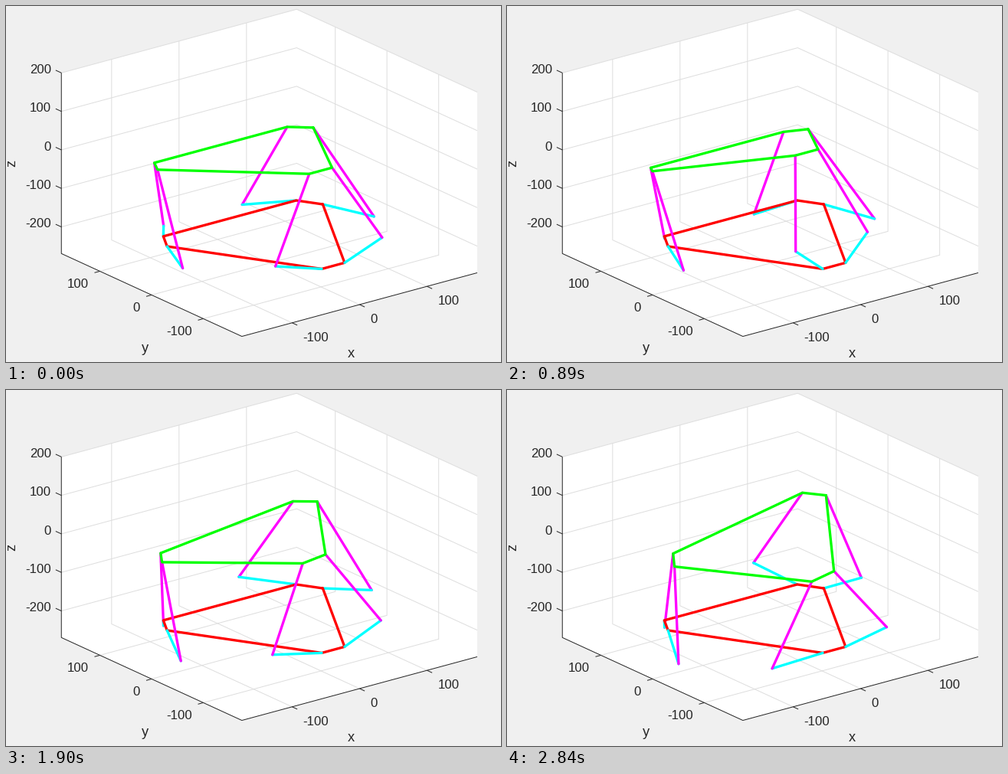
Recreate the animation shown at these times as a matplotlib script. Size 646 by 465 pixels, loop 3220 ms.

```python
import numpy as np
import matplotlib.pyplot as plt
from matplotlib.animation import FuncAnimation
from matplotlib.collections import LineCollection

W, H, DPI = 646, 465, 64
TICK, LOOP = 10, 3220            # ms
LIM, ZMIN, ZMAX = 174.5, -269.2, 200
INK, GRID = "#262626", "#dedede"

# Hexapod: corner radius, servo arm length, rod length, base height
RADIUS, ARM, ROD, FLOOR = 124.7, 70, 211, -200
TURN, LAST = 12, 37              # step of the reversal, last step


def pt(px):
    return px * 72 / DPI


def proj(x, y, z):
    return (343.6 + 0.88 * x - 0.675 * y,
            200.5 - 0.238 * x - 0.31 * y - 0.503 * z)


def project(points):
    return np.column_stack(proj(*np.transpose(points)))


def closed(points):
    return np.vstack([points, points[:1]])


# Corners sit in three close pairs; each arm swings in the plane that is
# perpendicular to its corner's radius, away from its partner.
side = np.tile([-1, 1], 3)
angle = np.radians(np.repeat([30, 150, 270], 2) + 7.8 * side)
swing = angle + side * np.pi / 2
zero = np.zeros(6)
corners = RADIUS * np.column_stack([np.cos(angle), np.sin(angle), zero])
base = corners + [0, 0, FLOOR]
out = np.column_stack([np.cos(swing), np.sin(swing), zero])
up = np.array([0, 0, 1])


def rotation(pitch, roll, yaw):
    (cp, cr, cy), (sp, sr, sy) = (f(np.radians([pitch, roll, yaw]))
                                  for f in (np.cos, np.sin))
    rx = np.array([[1, 0, 0], [0, cp, -sp], [0, sp, cp]])
    ry = np.array([[cr, 0, -sr], [0, 1, 0], [sr, 0, cr]])
    rz = np.array([[cy, -sy, 0], [sy, cy, 0], [0, 0, 1]])
    return rz @ ry @ rx


def plate_at(step):
    """Platform corners: tilt and slide back, then level out while rolling."""
    pitch = -30 + 1.25 * abs(step - TURN)
    t = max(0, step - TURN) / (LAST - TURN)
    shift = 20 + 16.6 * step / TURN if step < TURN else 36.6 * (1 - t)
    turned = corners @ rotation(pitch, 27.5 * t, -8 * t * t).T
    return turned + [0, shift, 0]


def arm_tips(top):
    """Inverse kinematics: arm ends that keep every rod at its length."""
    d = top - base
    du, dz = (d * out).sum(axis=1), d[:, 2]
    reach = ((d ** 2).sum(axis=1) + ARM ** 2 - ROD ** 2) / (2 * ARM)
    a = np.arctan2(dz, du) - np.arccos(reach / np.hypot(du, dz))
    return base + ARM * (np.cos(a)[:, None] * out + np.sin(a)[:, None] * up)


# Start time of each step on the 10 ms clock; the pace slows slightly.
starts = np.interp(np.arange(LAST + 1), [0, 8, 18, LAST], [0, 580, 1350, 2840])
starts = np.round(starts / TICK) * TICK

fig = plt.figure(figsize=(W / DPI, H / DPI), dpi=DPI, facecolor="#f0f0f0")
ax = fig.add_axes([0, 0, 1, 1])
ax.set_xlim(0, W)
ax.set_ylim(H, 0)
ax.axis("off")


def lines(segs, color, z, width=3.3, cap="round"):
    col = LineCollection(segs, colors=color, linewidths=pt(width),
                         capstyle=cap, zorder=z)
    ax.add_collection(col, autolim=False)
    return col


def label(x, y, s, size=16.7, ha="center", rot=0):
    ax.text(x, y, s, fontsize=pt(size), family="Liberation Sans", color=INK,
            ha=ha, va="baseline", rotation=rot, rotation_mode="anchor")


def draw_box():
    rim = [(-LIM, LIM, ZMAX), (LIM, LIM, ZMAX), (LIM, -LIM, ZMAX),
           (LIM, -LIM, ZMIN), (-LIM, -LIM, ZMIN), (-LIM, LIM, ZMIN)]
    ax.fill(*project(rim).T, color="white", lw=0, zorder=0)

    grid, edge = [], []
    for v in (-100, 0, 100):
        grid.append([proj(v, -LIM, ZMIN), proj(v, LIM, ZMIN), proj(v, LIM, ZMAX)])
        grid.append([proj(-LIM, v, ZMIN), proj(LIM, v, ZMIN), proj(LIM, v, ZMAX)])
        x, y = proj(v, -LIM, ZMIN)
        edge.append([(x, y), proj(v, -LIM - 10, ZMIN)])
        label(x + 14, y + 24, v, ha="left")
        x, y = proj(-LIM, v, ZMIN)
        edge.append([(x, y), proj(-LIM - 8, v, ZMIN)])
        label(x - 15, y + 21.5, v, ha="right")
    for v in range(-200, 201, 100):
        grid.append([proj(-LIM, LIM, v), proj(LIM, LIM, v), proj(LIM, -LIM, v)])
        x, y = proj(-LIM, LIM, v)
        edge.append([(x, y), proj(-LIM, LIM + 11, v)])
        label(x - 13.5, y + 0.7, v, ha="right")
    edge.append(project([rim[0], rim[5], rim[4], rim[3]]))
    lines(grid, GRID, 1, 1, "butt")
    lines(edge, INK, 2, 1, "butt")

    label(450.5, 459, "x", 18.3)
    label(181, 452.5, "y", 18.3)
    label(12, 205.5, "z", 18.3, rot=90)


draw_box()

# Painted back to front: rear legs, base, front legs, platform
BACK, FRONT = slice(0, 3), slice(3, 6)
CYAN, MAGENTA = "#00ffff", "#ff00ff"
floor = project(base)
back_rods, back_arms = lines([], MAGENTA, 3), lines([], CYAN, 4)
lines([closed(floor)], "#ff0000", 5)
front_arms, front_rods = lines([], CYAN, 6), lines([], MAGENTA, 7)
plate = lines([], "#00ff00", 8)


def draw(i):
    step = np.searchsorted(starts, i * TICK, side="right") - 1
    top = plate_at(step)
    tips, top = project(arm_tips(top)), project(top)
    for part, rods, arms in ((BACK, back_rods, back_arms),
                             (FRONT, front_rods, front_arms)):
        rods.set_segments(list(zip(top[part], tips[part])))
        arms.set_segments(list(zip(floor[part], tips[part])))
    plate.set_segments([closed(top)])
    return back_rods, back_arms, front_arms, front_rods, plate


anim = FuncAnimation(fig, draw, frames=LOOP // TICK, interval=TICK,
                     repeat=True, repeat_delay=0, blit=False)
plt.show()
```
